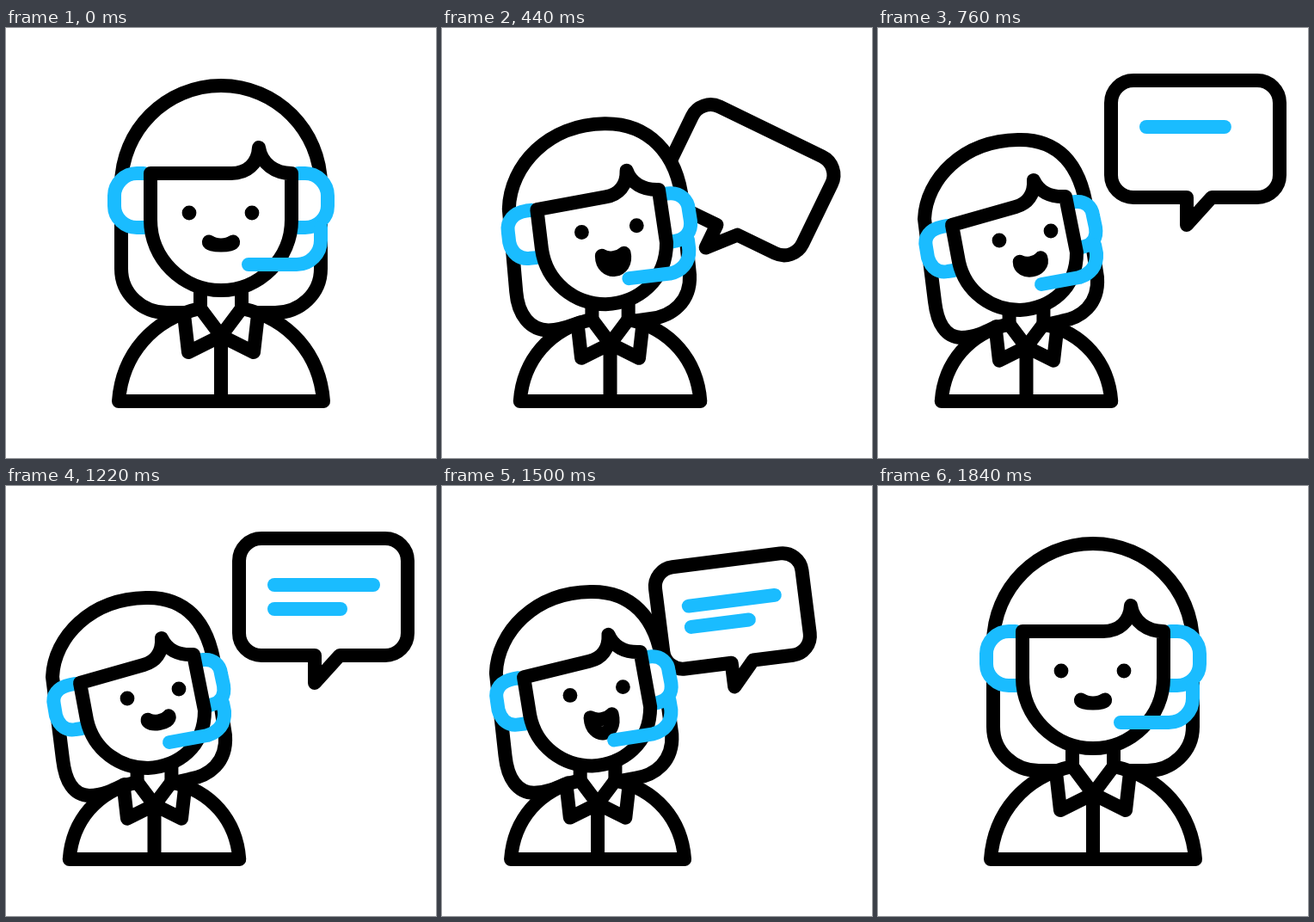
These frames come from a looping animation (500 by 500 pixels, 2 s). An HTML page with a canvas:

```html
<!DOCTYPE html>
<html lang="en">
<head>
<meta charset="utf-8">
<title>Support agent</title>
<style>
html, body { margin: 0; width: 100%; height: 100%; overflow: hidden; background: #fff; }
canvas { display: block; width: 500px; height: 500px; }
</style>
</head>
<body>
<canvas id="stage"></canvas>
<script>
const LOOP = 2000, INK = '#000', BLUE = '#1abcff';
const canvas = document.getElementById('stage');
const ctx = canvas.getContext('2d');
const dpr = window.devicePixelRatio || 1;
canvas.width = canvas.height = 500 * dpr;

const lerp = (a, b, k) => a + (b - a) * k;
const clamp = x => Math.max(0, Math.min(1, x));
function ease(t, from, to) {
  const u = clamp((t - from) / (to - from));
  return u * u * (3 - 2 * u);
}

// Each shape: upright pose, leaning pose
const hair = [
  'M215,331 C205,331 196,331 187,331 C158,331 134,309 134,280 L134,183 C134,119 186,67 250,67 C314,67 366,119 366,183 L366,280 C366,309 342,331 313,331 L285,331',
  'M138,347 C128,352 114,360 97,360 C79,360 69,344 66,318 L54,222 C56,176 98,131 163,130 C207,129 235,155 243,212 L255,290 C257,322 236,337 213,341 L195,345'];
const face = [
  'M168,169 L168,223 C168,268 205,305 250,305 C295,305 332,268 332,223 L332,169 C313,169 297,158 294,139 C293,158 280,169 262,169 Z',
  'M86,229 L94,272 C102,308 133,328 165,328 C200,326 231,304 231,261 L218,196 C200,197 187,190 181,177 C182,194 174,204 160,208 Z'];
const leftCup = [
  'M160,169 L152,169 C138,169 126,181 126,195 L126,207 C126,221 138,232 152,232 L160,232',
  'M80,230 L75,231 C60,234 53,243 56,255 L58,267 C62,280 71,285 81,283 L88,282'];
const rightCup = [
  'M340,169 L348,169 C362,169 374,181 374,195 L374,207 C374,221 362,232 348,232 L340,232',
  'M222,203 L230,202 C241,201 249,208 250,218 L253,232 C255,244 249,252 240,254 L234,256'];
const mic = [
  'M366,232 L366,247 C366,262 354,275 338,275 L282,275',
  'M252,252 L254,262 C255,277 247,286 234,290 L190,298'];
const eyes = [[[213, 215], [141, 247]], [[286, 215], [201, 236]]];

const torso = 'M131,434 C135,380 170,338 226,326 L250,358 L274,326 C330,338 365,380 369,434 Z';
const seams = 'M226,300 V326 M274,300 V326 M250,358 V434 M207,333 L212,377 L250,358 L288,377 L293,333';
const balloon = 'M359,229 L388,197 H441 A26,26 0 0 0 467,171 V87 A26,26 0 0 0 441,61 H297 A26,26 0 0 0 271,87 V171 A26,26 0 0 0 297,197 H359 Z';

function morph([a, b], k) {
  const goal = b.match(/[\d.]+/g);
  let i = 0;
  return new Path2D(a.replace(/[\d.]+/g, n => lerp(+n, +goal[i++], k).toFixed(2)));
}

// Moves the shape but leaves the line weight alone
function place(d, matrix) {
  const path = new Path2D();
  path.addPath(new Path2D(d), matrix);
  return path;
}

function draw(path, color, filled) {
  if (filled) {
    ctx.fillStyle = '#fff';
    ctx.fill(path);
  }
  ctx.strokeStyle = color;
  ctx.stroke(path);
}

function drawBubble(t, lean) {
  const opening = t < 1000;
  const away = 1 - lean;
  let turn, size;
  if (opening) {
    turn = 87 * away;
    size = 1 - 0.27 * away;
  } else {
    turn = -11.5 * ease(t, 1260, 1390) + 101 * ease(t, 1455, 1825);
    size = 1 - 0.125 * ease(t, 1370, 1510) - 0.28 * ease(t, 1520, 1850);
  }
  const x = lerp(359, opening ? 183 : 189, away);
  const y = lerp(229, opening ? 318 : 270, away);
  const m = new DOMMatrix().translate(x, y).rotate(turn).scale(size).translate(-359, -229);
  draw(place(balloon, m), INK, true);
  textLine(m, 115, 115 * ease(t, 620, 820));
  textLine(m, 143, 77 * ease(t, 820, 1020));
}

function textLine(m, y, length) {
  if (length > 0) draw(place(`M312,${y} h${length}`, m), BLUE);
}

function drawMouth(t, lean) {
  const talk = 13.5 + 7 * Math.cos((t - 1480) / 560 * 2 * Math.PI);
  const depth = lerp(4, talk, ease(lean, 0, 0.4));
  const x = lerp(250, 177, lean), y = lerp(248.5, 269.5, lean);
  const half = lerp(14, 12.5, lean), drop = depth * 4 / 3;
  const dip = Math.min(drop, 5.3), wide = half * 1.2;
  const path = `M${-half},0 C${-half / 2},${dip} ${half / 2},${dip} ${half},0 ` +
    `C${wide},${drop} ${-wide},${drop} ${-half},0 Z`;
  draw(place(path, new DOMMatrix().translate(x, y).rotate(-10 * lean)), INK);
}

function drawAgent(t, lean) {
  const size = 1 - 0.17 * lean;
  const body = new DOMMatrix().translate(250 - 77.5 * lean, 434).scale(size).translate(-250, -434);
  draw(morph(hair, lean), INK, true);
  draw(place(torso, body), INK, true);
  draw(place(seams, body), INK);
  draw(morph(leftCup, lean), BLUE, true);
  draw(morph(rightCup, lean), BLUE, true);
  draw(morph(face, lean), INK, true);
  ctx.fillStyle = INK;
  for (const [a, b] of eyes) {
    ctx.beginPath();
    ctx.arc(lerp(a[0], b[0], lean), lerp(a[1], b[1], lean), 8.4, 0, 2 * Math.PI);
    ctx.fill();
  }
  drawMouth(t, lean);
  draw(morph(mic, lean), BLUE);
}

function frame(now) {
  const t = now % LOOP;
  const lean = t < 180 || t >= 1840 ? 0 : ease(t, 160, 600) - ease(t, 1410, 1850);
  ctx.setTransform(dpr, 0, 0, dpr, 0, 0);
  ctx.fillStyle = '#fff';
  ctx.fillRect(0, 0, 500, 500);
  ctx.lineWidth = 16;
  ctx.lineCap = ctx.lineJoin = 'round';
  if (lean > 0.03) drawBubble(t, lean);
  drawAgent(t, lean);
}

const start = performance.now();
function tick() {
  frame(performance.now() - start);
  requestAnimationFrame(tick);
}
tick();
</script>
</body>
</html>
```
